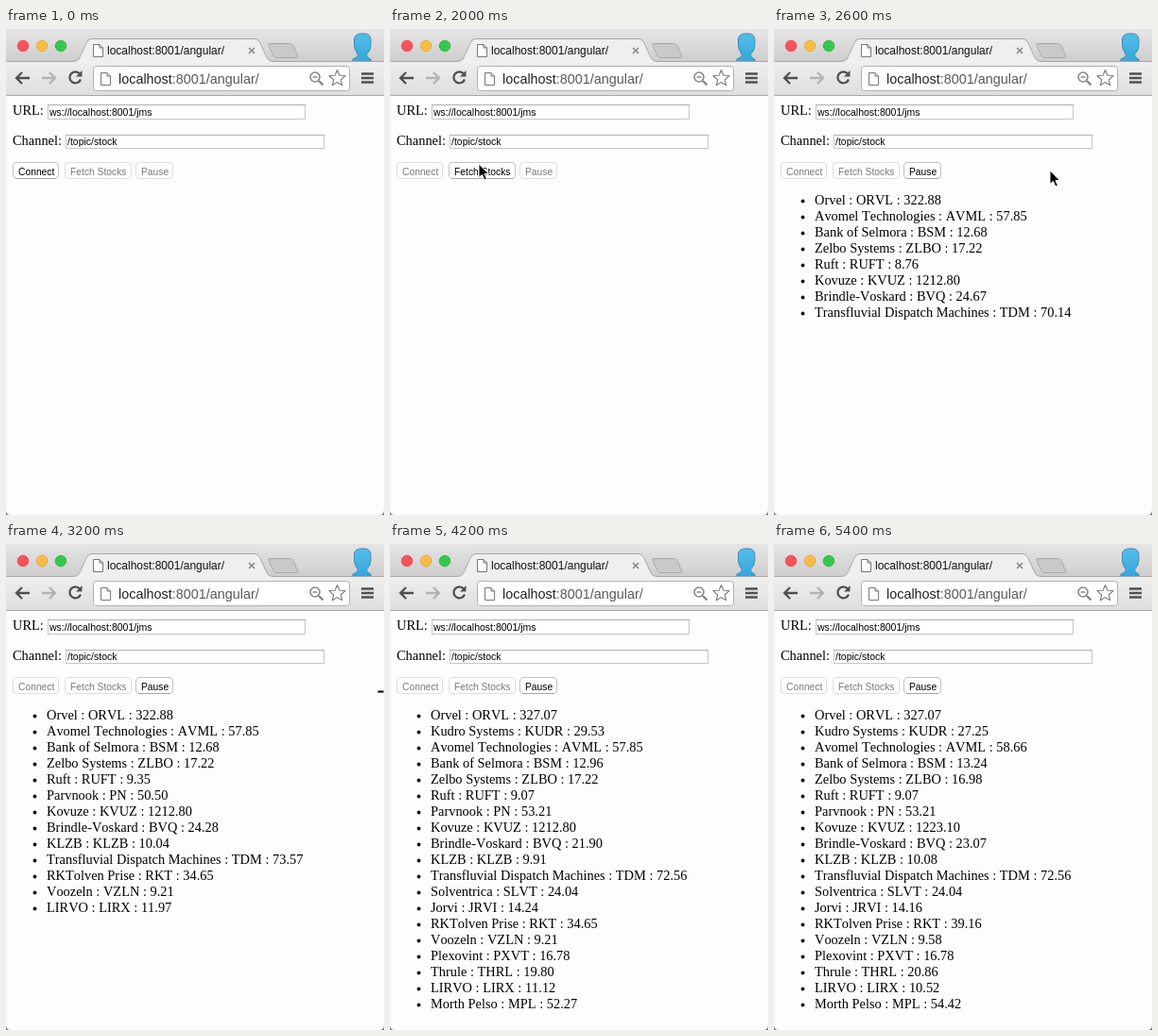
Animation of 400x516 px, one loop 5500 ms. Source, as an HTML page:

```html
<!DOCTYPE html>
<html lang="en">
<head>
<meta charset="utf-8">
<title>Stock ticker</title>
<style>
html, body { margin: 0; width: 100%; height: 100%; overflow: hidden; background: #fdfdfd; }
svg { display: block; width: 400px; height: 516px; }
text { white-space: pre; font-kerning: none; }
.serif { font: 14.4px "Liberation Serif", "Times New Roman", serif; }
.ui { font: 10.3px "Liberation Sans", Arial, sans-serif; }
.field { font: 10.5px "Liberation Sans", Arial, sans-serif; }
.tab { font: 12px "Liberation Sans", Arial, sans-serif; }
.address { font: 14.4px "Liberation Sans", Arial, sans-serif; }
.button rect { fill: #fdfdfd; stroke: #dedede; }
.button text { fill: #7c7c7c; }
.button.on rect { fill: #fff; stroke: #c2c2c2; }
.button.on text { fill: #000; }
.button path { stroke: none; }
.button.on path { stroke: #a8a8a8; }
</style>
</head>
<body>
<svg viewBox="0 0 400 516" xmlns="http://www.w3.org/2000/svg">
  <defs>
    <linearGradient id="strip" x2="0" y2="1">
      <stop stop-color="#e6e6e6"/><stop offset="1" stop-color="#cdcdcd"/>
    </linearGradient>
    <linearGradient id="bar" x2="0" y2="1">
      <stop stop-color="#efefef"/><stop offset="1" stop-color="#dedede"/>
    </linearGradient>
    <linearGradient id="blue" x2="0" y2="1">
      <stop stop-color="#55bdea"/><stop offset="1" stop-color="#35a5dc"/>
    </linearGradient>
    <path id="sheet" d="M.5 .5H7L10.5 4V13.5H.5ZM7 .5V4H10.5" fill="#fff" stroke="#777"/>
  </defs>

  <rect width="400" height="516" fill="#fdfdfd"/>

  <!-- tab strip -->
  <rect width="400" height="36" fill="url(#strip)"/>
  <path d="M0 .5H400" stroke="#f2f2f2"/>
  <g stroke-width=".8">
    <circle cx="18" cy="19" r="5.8" fill="#f9535a" stroke="#de464b"/>
    <circle cx="38" cy="19" r="5.8" fill="#fdbc40" stroke="#dfa23a"/>
    <circle cx="58" cy="19" r="5.8" fill="#35c84a" stroke="#2cae40"/>
  </g>
  <path d="M279 16.500H300Q303 16.500 304 19L308.500 29Q309.500 31.500 307 31.500H287Q284 31.500 283 29L278 18.500Q277 16.500 279 16.500Z" fill="#cacaca" stroke="#a9a9a9"/>
  <path d="M367 35.500V33Q372.500 31.500 372.500 28Q368.500 24 368.500 18V12Q369 6.500 375 6H380Q385.500 6.500 386 12V18Q386 24 381.500 28Q381.500 31.500 386 33V35.500Z" fill="url(#blue)" stroke="#3c86ab" stroke-width=".9"/>

  <!-- toolbar -->
  <rect y="35" width="400" height="37" fill="url(#bar)"/>
  <path d="M0 35.500H400M0 71.500H400" stroke="#a9a9a9"/>
  <path d="M71 35.500C77 35 78 32 80 27L85 16Q87 11.500 91 11.500H263Q267 11.500 269 16L274 27C276 32 277 35 283 35.500V37H71Z" fill="#efefef"/>
  <path d="M71 35.500C77 35 78 32 80 27L85 16Q87 11.500 91 11.500H263Q267 11.500 269 16L274 27C276 32 277 35 283 35.500" fill="none" stroke="#a9a9a9"/>
  <use href="#sheet" x="92" y="17"/>
  <text class="tab" x="107" y="28" fill="#111">localhost:8001/angular/</text>
  <path d="M257 21L263 27M263 21L257 27" stroke="#858585" stroke-width="1.500"/>

  <rect x="92.500" y="40.500" width="271" height="26" rx="3" fill="#fff" stroke="#b2b2b2"/>
  <use href="#sheet" x="100" y="47"/>
  <text class="address" x="119" y="59" fill="#222">localhost<tspan fill="#595959">:8001/angular/</tspan></text>
  <g fill="none" transform="translate(0 -1)">
    <g stroke-width="2.300">
      <path d="M25 54H11.500M17 48L11 54L17 60" stroke="#505050"/>
      <path d="M38 54H51.500M46 48L52 54L46 60" stroke="#b3b3b3"/>
      <path d="M78 49.500A6 6 0 1 0 79 55.500" stroke="#505050"/>
      <path d="M376 49.500H389M376 54H389M376 58.500H389" stroke="#505050"/>
    </g>
    <path d="M80.500 46V52.500H74Z" fill="#505050"/>
    <g stroke="#858585">
      <circle cx="327" cy="53" r="5" stroke-width="1.600"/>
      <path d="M324.500 53H329.500" stroke-width="1.400"/>
      <path d="M331 57L335.500 61.500" stroke-width="2.400"/>
      <path id="star" stroke-width="1.200" stroke-linejoin="round"/>
    </g>
  </g>

  <!-- page -->
  <g class="serif">
    <text x="7" y="92">URL:</text>
    <text x="7" y="124">Channel:</text>
  </g>
  <g fill="#fff" stroke="#c6c6c6">
    <rect x="44.500" y="81.500" width="272" height="15"/>
    <rect x="63.500" y="113.500" width="273" height="14"/>
  </g>
  <path d="M44 81.500H317M63 113.500H337" stroke="#b0b0b0"/>
  <g class="field">
    <text x="46" y="93">ws://localhost:8001/jms</text>
    <text x="65" y="124">/topic/stock</text>
  </g>
  <g id="buttons" class="ui"></g>
  <g id="list" class="serif"></g>

  <path d="M0 511V516H5Q0 516 0 511ZM400 511V516H395Q400 516 400 511Z" fill="#777"/>
  <path id="arrow" d="M0 0V14.500L3.400 11.400L5.900 17L8.400 15.900L6 10.500H10.500Z" fill="#000" stroke="#fff" stroke-width="1"/>
  <path id="resize" d="M393 156H400V159H393Z" fill="#111" stroke="#fff" stroke-width=".8"/>
</svg>
<script>
const LOOP = 5500, STEP = 100, ROW = 17;
const $ = id => document.getElementById(id);

function add(parent, tag, attrs, text = '') {
  const el = document.createElementNS('http://www.w3.org/2000/svg', tag);
  for (const key in attrs) el.setAttribute(key, attrs[key]);
  el.textContent = text;
  return parent.appendChild(el);
}

// label, then "time:price" for each quote received
const stocks = [
  ['Orvel : ORVL', '2200:322.88 3700:327.07'],
  ['Kudro Systems : KUDR', '3800:29.53 4400:27.25'],
  ['Avomel Technologies : AVML', '2300:57.85 4600:58.66'],
  ['Bank of Selmora : BSM', '2300:12.68 3500:12.96 5000:13.24'],
  ['Zelbo Systems : ZLBO', '2400:17.22 4900:16.98'],
  ['Ruft : RUFT', '2500:8.76 2900:9.35 3900:9.07'],
  ['Parvnook : PN', '2700:50.50 3800:53.21'],
  ['Kovuze : KVUZ', '2500:1212.80 5100:1223.10'],
  ['Brindle-Voskard : BVQ', '2600:24.67 3000:24.28 4000:21.90 4700:23.07'],
  ['KLZB : KLZB', '2700:10.04 3600:9.91 5200:10.08'],
  ['Transfluvial Dispatch Machines : TDM', '2600:70.14 3100:73.57 4100:72.56'],
  ['Solventrica : SLVT', '3400:24.04'],
  ['Jorvi : JRVI', '3300:14.24 4500:14.16'],
  ['RKTolven Prise : RKT', '2800:34.65 5300:39.16'],
  ['Voozeln : VZLN', '2900:9.21 4800:9.58'],
  ['Plexovint : PXVT', '3600:16.78'],
  ['Thrule : THRL', '3900:19.80 5000:20.86'],
  ['LIRVO : LIRX', '3000:11.97 4000:11.12 4300:10.52'],
  ['Morth Pelso : MPL', '4100:52.27 5400:54.42']
].map(([label, log]) => ({
  label,
  quotes: log.split(' ').map(q => q.split(':'))
}));

// label, left, width, time enabled, time disabled
const buttons = [
  ['Connect', 7, 49, 0, 1400],
  ['Fetch Stocks', 62, 71, 1500, 2100],
  ['Pause', 137, 40, 2200, LOOP]
].map(([label, x, w, from, to]) => {
  const el = add($('buttons'), 'g', {});
  add(el, 'rect', { x: x + .5, y: 142.5, width: w - 1, height: 17, rx: 3.5 });
  add(el, 'path', { d: `M${x + 3} 159.5H${x + w - 3}` });
  add(el, 'text', { x: x + 6, y: 156 }, label);
  return { el, from, to };
});

const rows = stocks.map((_, i) => {
  const el = add($('list'), 'g', { transform: `translate(0 ${187 + ROW * i})` });
  add(el, 'circle', { cx: 30.5, cy: -3.5, r: 1.9 });
  return { el, text: add(el, 'text', { x: 43, y: 0 }) };
});

const star = [...Array(10).keys()].map(i => {
  const r = i % 2 ? 4 : 9, a = i * Math.PI / 5;
  return `${(350.5 + r * Math.sin(a)).toFixed(2)} ${(54.5 - r * Math.cos(a)).toFixed(2)}`;
});
$('star').setAttribute('d', `M${star.join('L')}Z`);

const linear = p => p;
const easeIn = p => p ** 1.5;
const easeOut = p => 1 - (1 - p) ** 2;
const smooth = p => p * p * (3 - 2 * p);

// time, x, y, easing of the move that ends here
const path = [
  [200, 175, 516, linear],
  [600, 110, 330, linear],
  [1100, 33, 144, easeOut],
  [1400, 33, 144, linear],
  [1800, 94, 144, smooth],
  [2100, 94, 144, linear],
  [2600, 292, 151, easeIn],
  [3000, 393, 153, easeOut]
];

function pointer(t) {
  const i = path.findIndex(k => k[0] >= t);
  if (i < 1) return null;
  const [t0, x0, y0] = path[i - 1], [t1, x1, y1, ease] = path[i];
  const p = ease((t - t0) / (t1 - t0));
  return [x0 + (x1 - x0) * p, y0 + (y1 - y0) * p];
}

const show = (el, on) => el.setAttribute('visibility', on ? 'visible' : 'hidden');

function draw(time) {
  const t = Math.floor(time % LOOP / STEP) * STEP;

  for (const { el, from, to } of buttons)
    el.setAttribute('class', t >= from && t < to ? 'button on' : 'button');

  let n = 0;
  for (const { label, quotes } of stocks) {
    const seen = quotes.filter(q => +q[0] <= t);
    if (seen.length) rows[n++].text.textContent = `${label} : ${seen[seen.length - 1][1]}`;
  }
  rows.forEach((row, i) => show(row.el, i < n));

  const at = pointer(t);
  show($('arrow'), at);
  if (at) $('arrow').setAttribute('transform', `translate(${at[0].toFixed(2)} ${at[1].toFixed(2)})`);
  show($('resize'), t > 3000 && t < 3400);
}

const start = performance.now();
function tick() {
  draw(performance.now() - start);
  requestAnimationFrame(tick);
}
tick();
</script>
</body>
</html>
```
